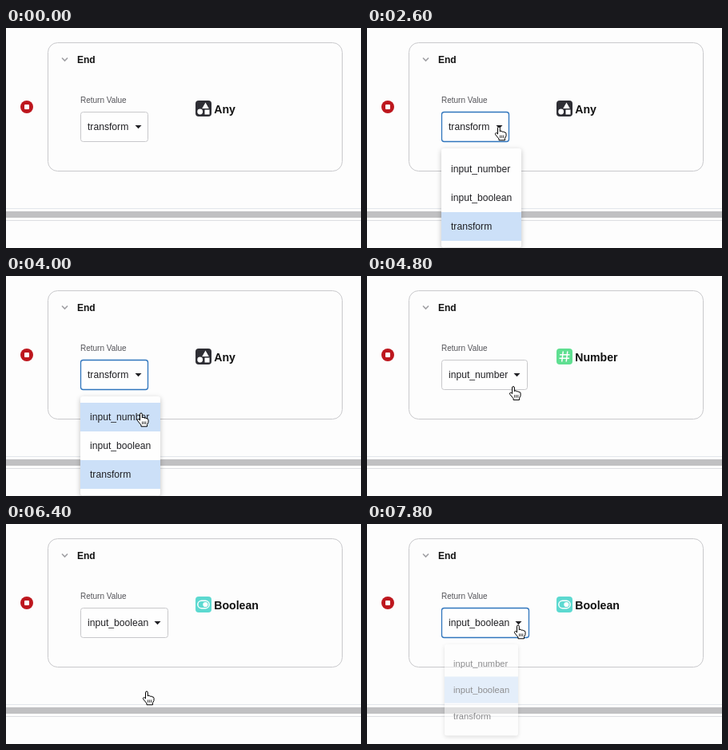
These frames come from a looping animation (444x276 px, 8 s). An HTML page:

```html
<!DOCTYPE html>
<html lang="en">
<head>
<meta charset="utf-8">
<title>Return value picker</title>
<style>
html, body { margin: 0; width: 100%; height: 100%; overflow: hidden; background: #fdfdfd; }
svg { display: block; width: 100vw; height: 100vh; }
text { font: 12.15px "Liberation Sans", Arial, sans-serif; fill: #202024; }
.bold { font-weight: bold; font-size: 12px; fill: #111; }
.type { font-weight: bold; font-size: 14.1px; fill: #111; }
.label { font-size: 10px; fill: #55555a; }
#menu > rect:first-child { filter: drop-shadow(0 2px 3px rgba(0,0,0,.24)); }
</style>
</head>
<body>
<svg viewBox="0 0 444 276">
  <rect x="52.5" y="18.5" width="368" height="161" rx="12" fill="#fdfdfd" stroke="#c9c9cc"/>
  <path d="M0 226.5H444" stroke="#e3e6ec"/>
  <path d="M0 234H444" stroke="#c0c0c2" stroke-width="8"/>
  <path d="M0 241.5H444" stroke="#dcdee2"/>
  <circle cx="26" cy="99" r="8" fill="#bd171e"/>
  <rect x="23" y="96" width="6" height="6" rx="1" fill="#fff"/>
  <path d="M70 37.5l3.5 3.5 3.5-3.5" fill="none" stroke="#a0a0a4" stroke-width="1.6"/>
  <text class="bold" x="89" y="44">End</text>
  <text class="label" x="93" y="94">Return Value</text>

  <rect id="box" x="93.5" y="105.5" height="37" rx="3" fill="#fefefe"/>
  <text id="value" x="102" y="128"></text>
  <path id="caret" d="M-4 122h8l-4 4.3z" fill="#202024"/>

  <g id="icons">
    <g>
      <rect x="237" y="91" width="20" height="20" rx="4" fill="#2e2e34"/>
      <path d="M249.5 93.5l4.3 7.5h-8.6zM248.5 102.5h6v6h-6z" fill="#fff"/>
      <circle cx="242.7" cy="105" r="3.4" fill="#fff"/>
    </g>
    <g>
      <rect x="237" y="91" width="20" height="20" rx="4" fill="#5fdf91"/>
      <path d="M245.3 94.5l-1.6 13M250.8 94.5l-1.6 13M241 98.7h12.5M240.5 103.3H253" stroke="#fff" stroke-width="1.5"/>
    </g>
    <g>
      <rect x="237" y="91" width="20" height="20" rx="4" fill="#5cd9d0"/>
      <rect x="239.8" y="96.3" width="14.4" height="9.4" rx="4.7" fill="none" stroke="#fff" stroke-width="1.4"/>
      <circle cx="249.4" cy="101" r="3.1" fill="#fff"/>
    </g>
  </g>
  <text id="type" class="type" x="260.3" y="107"></text>

  <g id="menu"><rect x="93" y="151" width="100" height="124.5" rx="3" fill="#fefefe"/></g>

  <g id="pointer">
    <path d="M0 0V14.5L3.4 11.4 5.6 16.6 8.1 15.5 5.9 10.5H10.4Z" fill="#000" stroke="#fff" stroke-width=".9"/>
    <g fill="#fff" stroke="#000" stroke-linejoin="round">
      <path d="M-1.5 1.2Q-1.4 0 0 0 1.3 0 1.3 1.2V6Q1.5 5 3 5.2 4.2 5.4 4.3 6.4 6 5.4 7 7 8.8 6.5 9 8.4V11.5L7.5 14.5V16.8H0V15L-4.3 9.8Q-5 8 -3.8 7.6 -2.8 7.4 -1.5 9Z"/>
      <path d="M1.6 10.5v3.5M3.7 10.5v3.5M5.8 10.5v3.5" stroke-width=".8"/>
    </g>
  </g>
</svg>
<script>
const $ = id => document.getElementById(id);
const LOOP = 8000, STEP = 200;
const options = [
  { name: "transform", type: "Any", width: 84, caret: 165.5 },
  { name: "input_number", type: "Number", width: 107, caret: 187.5 },
  { name: "input_boolean", type: "Boolean", width: 109, caret: 189.5 }
];
const order = [1, 2, 0]; // menu rows, top to bottom
const path = [ // time, x, y
  [800, 450, 160], [1600, 165, 120], [2000, 165, 124], [3200, 165, 124],
  [4000, 169, 172], [4400, 169, 172], [5000, 188, 127], [5300, 188, 127],
  [5800, 177.5, 193], [6100, 176, 211], [6400, 176, 210], [6900, 176, 210],
  [7400, 189, 127], [8000, 189, 127]
];
const openings = [[2120, 4300], [4960, 6150], [7700, 9000]]; // open, close
const FADE = 200;

const rows = order.map((_, i) => {
  const y = 159 + 36 * i;
  $("menu").insertAdjacentHTML("beforeend",
    `<rect x="93" y="${y}" width="100" height="36" fill="#cce0f8"/>
     <text x="105" y="${y + 22}">${options[order[i]].name}</text>`);
  return $("menu").querySelectorAll("rect")[i + 1];
});

const clamp = v => Math.max(0, Math.min(1, v));
const ease = v => v * v * (3 - 2 * v);

function pointerAt(t) {
  const i = path.findIndex(p => p[0] > t);
  if (i < 1) return path[0].slice(1);
  const [a, b] = [path[i - 1], path[i]];
  const k = ease((t - a[0]) / (b[0] - a[0]));
  return [1, 2].map(n => a[n] + (b[n] - a[n]) * k);
}

function draw(t) {
  const chosen = t < 4300 ? 0 : t < 6150 ? 1 : 2;
  const option = options[chosen];
  const [x, y] = pointerAt(t);

  const focused = openings.some(([a, b]) => t >= a && t < b);
  $("box").setAttribute("width", option.width);
  $("box").setAttribute("stroke", focused ? "#2f75bd" : "#c8c8cb");
  $("box").setAttribute("stroke-width", focused ? 1.3 : 1);
  $("value").textContent = option.name;
  $("caret").setAttribute("transform", `translate(${option.caret})`);
  $("type").textContent = option.type;
  [...$("icons").children].forEach((g, i) => g.style.display = i === chosen ? "" : "none");

  const open = Math.max(...openings.map(([a, b]) =>
    Math.min(clamp((t - a) / FADE), clamp(1 - (t - b) / FADE))));
  const scale = 0.84 + 0.16 * open;
  $("menu").setAttribute("opacity", open);
  $("menu").setAttribute("transform", `translate(143 151) scale(${scale}) translate(-143 -151)`);
  const hover = Math.floor((y - 159) / 36);
  rows.forEach((row, i) =>
    row.style.display = order[i] === chosen || i === hover ? "" : "none");

  const [arrow, hand] = $("pointer").children;
  arrow.style.display = t < 1800 ? "" : "none";
  hand.style.display = t < 1800 ? "none" : "";
  $("pointer").setAttribute("transform", `translate(${x} ${y})`);
}

function tick() {
  draw(Math.floor(performance.now() % LOOP / STEP) * STEP);
  requestAnimationFrame(tick);
}
tick();
</script>
</body>
</html>
```
